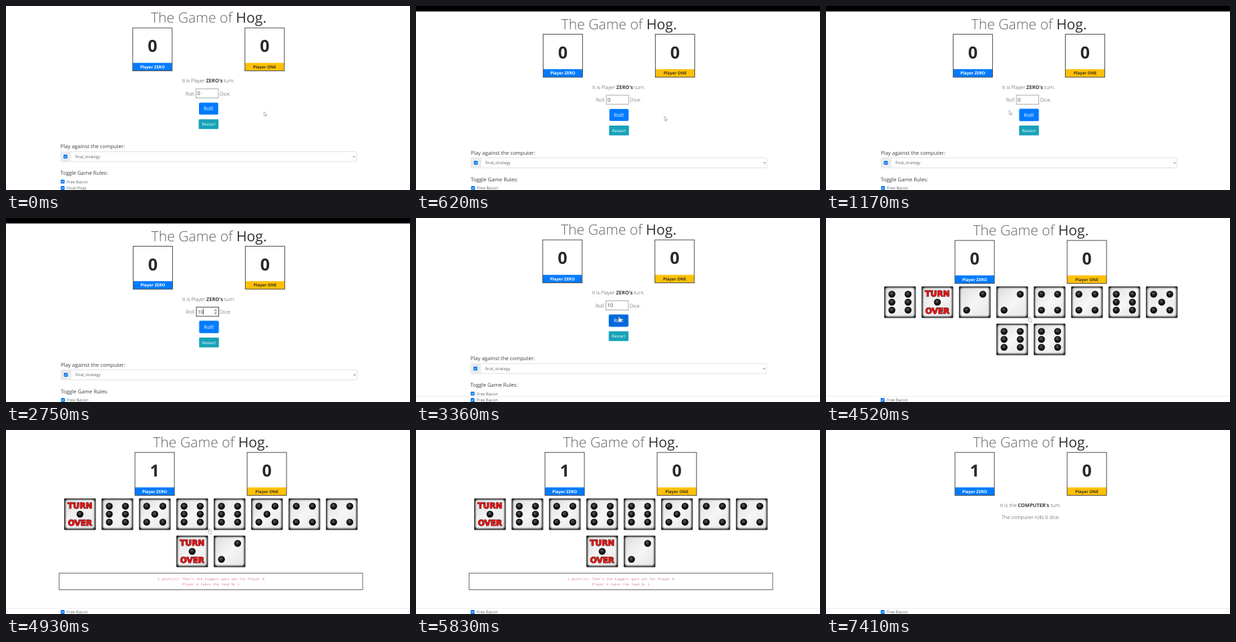
Animation of 605x277 px, one loop 8 s. Source, as an HTML page:

```html
<!DOCTYPE html>
<html lang="en">
<head>
<meta charset="utf-8">
<title>Hog</title>
<style>
html, body { margin: 0; width: 100%; height: 100%; overflow: hidden; background: #fff; }
svg { display: block; width: 605px; height: 277px; }
text { font-family: "Open Sans", "Noto Sans", sans-serif; fill: #3a3d40; text-rendering: geometricPrecision; white-space: pre; }
.mid { text-anchor: middle; }
.title { font-size: 21.2px; font-weight: 300; fill: #606366; }
.score { font-size: 25px; font-weight: 700; fill: #26292c; }
.name { font-size: 6.2px; font-weight: 700; }
.lead { font-size: 7.5px; font-weight: 300; }
.head { font-size: 7.8px; }
.small { font-size: 6.05px; fill: #5c6268; }
.white { fill: #fff; }
.bold { font-weight: 700; }
.log { font: 5.13px "Liberation Mono", monospace; fill: #d27d94; }
.over { font: 700 11.9px "DejaVu Sans", sans-serif; fill: #f01414; stroke: #4a0c0c; stroke-width: 1.1px; paint-order: stroke; }
</style>
</head>
<body>
<svg viewBox="0 0 605 277">
  <defs>
    <filter id="soft" x="-20%" y="-20%" width="140%" height="140%"><feGaussianBlur stdDeviation="1"/></filter>
    <filter id="edge" x="-20%" y="-20%" width="140%" height="140%"><feGaussianBlur stdDeviation=".45"/></filter>
    <linearGradient id="face" x2="1" y2="1">
      <stop stop-color="#dedede"/><stop offset=".5" stop-color="#f6f6f6"/><stop offset="1" stop-color="#e6e6e6"/>
    </linearGradient>
    <radialGradient id="ball" cx=".45" cy=".4" r=".65">
      <stop stop-color="#666"/><stop offset=".4" stop-color="#222"/><stop offset=".75" stop-color="#080808"/><stop offset="1" stop-color="#555"/>
    </radialGradient>
    <g id="die">
      <rect x="-23.7" y="-23.7" width="47.4" height="47.4" rx="1" fill="#1c1c1c" filter="url(#edge)"/>
      <rect x="-21.9" y="-21.9" width="43.8" height="43.8" rx="4" fill="url(#face)" filter="url(#soft)"/>
    </g>
    <circle id="pip" r="5.2" fill="url(#ball)" filter="url(#edge)"/>
    <g id="tick">
      <rect x="-2.9" y="-2.9" width="5.8" height="5.8" rx="1" fill="#0275e8"/>
      <path d="M-1.6 0l1.2 1.3 2-2.6" fill="none" stroke="#fff" stroke-width=".9"/>
    </g>
  </defs>

  <g id="page">
    <text class="title mid" x="303.5" y="25">The Game of <tspan font-weight="400" fill="#2c2f32">Hog.</tspan></text>
    <g id="cards"></g>

    <g id="turn">
      <text class="lead mid" x="303" y="115">It is Player <tspan class="bold">ZERO's</tspan> turn.</text>
      <text class="lead" x="269" y="134.6">Roll</text>
      <text class="lead" x="320" y="134.6">Dice.</text>
      <rect id="box" x="284.5" y="124.7" width="33.5" height="13.8" fill="#fff" stroke-width="1"/>
      <rect id="pick" x="286.2" y="126.5" width="4.8" height="9.6" fill="#3390ff"/>
      <text id="count" x="286.4" y="134.4" font-size="7.5"></text>
      <path id="caret" d="M295.1 126.6v9.2" stroke="#222" stroke-width=".7"/>
      <g id="spin">
        <rect x="310.3" y="126.6" width="6" height="10" fill="#eee"/>
        <path d="M311.8 130l1.5-1.8 1.5 1.8zM311.8 133.2l1.5 1.8 1.5-1.8z" fill="#555"/>
      </g>
      <rect id="ring" x="288.2" y="144.7" width="30.4" height="19.6" rx="2.4" fill="#8cc2ff"/>
      <rect id="roll" x="289" y="145.5" width="28.8" height="18" rx="1.8"/>
      <text class="mid white" x="303.4" y="157.3" font-size="7.5">Roll!</text>
      <rect x="288.6" y="170.6" width="29.6" height="14.6" rx="1.2" fill="#17a2b8"/>
      <text class="mid white" x="303.4" y="180.2" font-size="6.1">Restart</text>

      <text class="head" x="81.5" y="214">Play against the computer:</text>
      <rect x="82" y="219.2" width="443" height="15" rx="1.4" fill="#fff" stroke="#ced4da" stroke-width=".7"/>
      <path d="M82.4 219.5h14.8v14.4h-14.8z" fill="#e9ecef"/>
      <use href="#tick" x="89" y="226.7"/>
      <text class="small" x="103.5" y="228.9">final_strategy</text>
      <path d="M519.7 225.9l1.6 1.6 1.6-1.6" fill="none" stroke="#444" stroke-width=".8"/>
      <text class="head" x="81.5" y="254.3">Toggle Game Rules:</text>
      <use href="#tick" x="84.8" y="264.3"/><text class="small" x="91" y="266.6">Free Bacon</text>
      <use href="#tick" x="84.8" y="274"/><text class="small" x="91" y="276.3">Feral Hogs</text>
    </g>
  </g>

  <g id="dice"></g>

  <g id="log">
    <rect x="79.5" y="215.5" width="454.6" height="25" fill="#fff" stroke="#6a6a6a"/>
    <text class="log mid" x="306.8" y="225.8">1 point(s)! That's the biggest gain yet for Player 0</text>
    <text class="log mid" x="306.8" y="234.2">Player 0 takes the lead by 1</text>
  </g>

  <g id="computer">
    <text class="lead mid" x="306.5" y="115.8">It is the <tspan class="bold">COMPUTER's</tspan> turn.</text>
    <text class="lead mid" x="306.5" y="134.3">The computer rolls 6 dice.</text>
  </g>

  <g id="footer">
    <path d="M0 268h605v9H0z" fill="#fff"/>
    <path d="M0 268.4h605" stroke="#e8e8e8" stroke-width=".8"/>
    <use href="#tick" x="84.8" y="274"/><text class="small" x="91" y="276.3">Free Bacon</text>
  </g>

  <path id="strip" d="M0 0h605v8.2H0z"/>
  <path id="arrow" d="M0 0v6.6l1.5-1.4 1 2.2 1-.4-1-2.2h2.1z" fill="#fff" stroke="#888" stroke-width=".6"/>
  <path id="hand" d="M303.6 149q.7-.9 1.3 0v2.4l2.6.6q.8.3.7 1.2l-.6 3.3h-3l-2.3-2.9q0-1 1.3-.4z" fill="#fff" stroke="#888" stroke-width=".6"/>
</svg>

<script>
const LOOP = 8000;
const $ = id => document.getElementById(id);
const show = (id, on) => $(id).style.display = on ? "" : "none";

// Value of the last [time, value] step already reached
const at = (steps, t) => steps.reduce((v, s) => t >= s[0] ? s[1] : v, null);

const offset = [[0, "0,0"], [100, ".6,9.5"], [3360, "0,0"], [3660, "3.3,.8"]];
const arrow = [[0, "386.3,159"], [100, "386.6,168"], [620, "372,166"], [710, "336,164"],
  [800, "304,162"], [1000, "296,160"], [1090, "284,158"], [1170, "274.3,157"],
  [1280, "281,149"], [1380, "294,140"], [1490, null]];
const entry = [[0, "0"], [2170, ""], [2570, "1"], [2750, "10"]];
const rolls = [[3660, "2513645263"], [3750, "5624136352"], [3830, "4642446164"],
  [4140, "4315262532"], [4340, "3564311426"], [4520, "6122446566"],
  [4730, "2463551635"], [4930, "1656654412"], [7410, null]];

function card(x, name, color, ink) {
  return `<rect x="${x}" y="33" width="59" height="64.6" fill="#fff"/>
    <rect x="${x}" y="85.6" width="59" height="12" fill="${color}"/>
    <rect x="${x}" y="33" width="59" height="64.6" fill="none" stroke="#4c4c4c"/>
    <text class="score mid" x="${x + 29.5}" y="69.3">0</text>
    <text class="name mid" x="${x + 29.5}" y="93.8" style="fill:${ink}">Player ${name}</text>`;
}
$("cards").innerHTML = card(189.8, "ZERO", "#007bff", "#fff") + card(357.8, "ONE", "#ffc107", "#3a3420");
const score = document.querySelector(".score");

function pips(n) {
  const spots = [];
  if (n % 2) spots.push([0, 0]);
  if (n > 1) spots.push([1, -1], [-1, 1]);
  if (n > 3) spots.push([-1, -1], [1, 1]);
  if (n > 5) spots.push([-1, 0], [1, 0]);
  return spots.map(([x, y]) => `<use href="#pip" x="${x * 12.1}" y="${y * 12}"/>`).join("");
}

function die(n, i) {
  const x = i < 8 ? 110.8 + 56 * i : 278.8 + 56 * (i - 8);
  const y = i < 8 ? 126.7 : 182.7;
  const label = n == 1 ? '<text class="over mid" y="-9.2">TURN</text><text class="over mid" y="17.8">OVER</text>' : "";
  return `<g transform="translate(${x},${y})"><use href="#die"/>${pips(+n)}${label}</g>`;
}

let shown = null;
function draw(t) {
  const between = (a, b) => t >= a && t < b;
  $("page").setAttribute("transform", `translate(${at(offset, t)})`);
  show("turn", t < 3660);
  show("strip", between(100, 3360));
  show("footer", t >= 3360);

  const focus = between(1380, 3360);
  $("box").setAttribute("stroke", focus ? "#444" : "#aaa");
  show("spin", focus);
  show("pick", between(2070, 2170));
  show("caret", between(2750, 3360));
  $("count").textContent = at(entry, t);
  show("ring", t >= 800);
  $("roll").setAttribute("fill", between(800, 1000) || t >= 3360 ? "#0069d9" : "#007bff");

  const pos = at(arrow, t);
  show("arrow", pos);
  if (pos) $("arrow").setAttribute("transform", `translate(${pos})`);
  show("hand", between(3360, 5830));

  const faces = at(rolls, t) || "";
  if (faces !== shown) $("dice").innerHTML = [...faces].map(die).join("");
  shown = faces;
  score.textContent = t >= 4930 ? 1 : 0;
  show("log", between(4930, 7410));
  show("computer", t >= 7410);
}

const start = performance.now();
function tick() {
  draw((performance.now() - start) % LOOP);
  requestAnimationFrame(tick);
}
tick();
</script>
</body>
</html>
```
